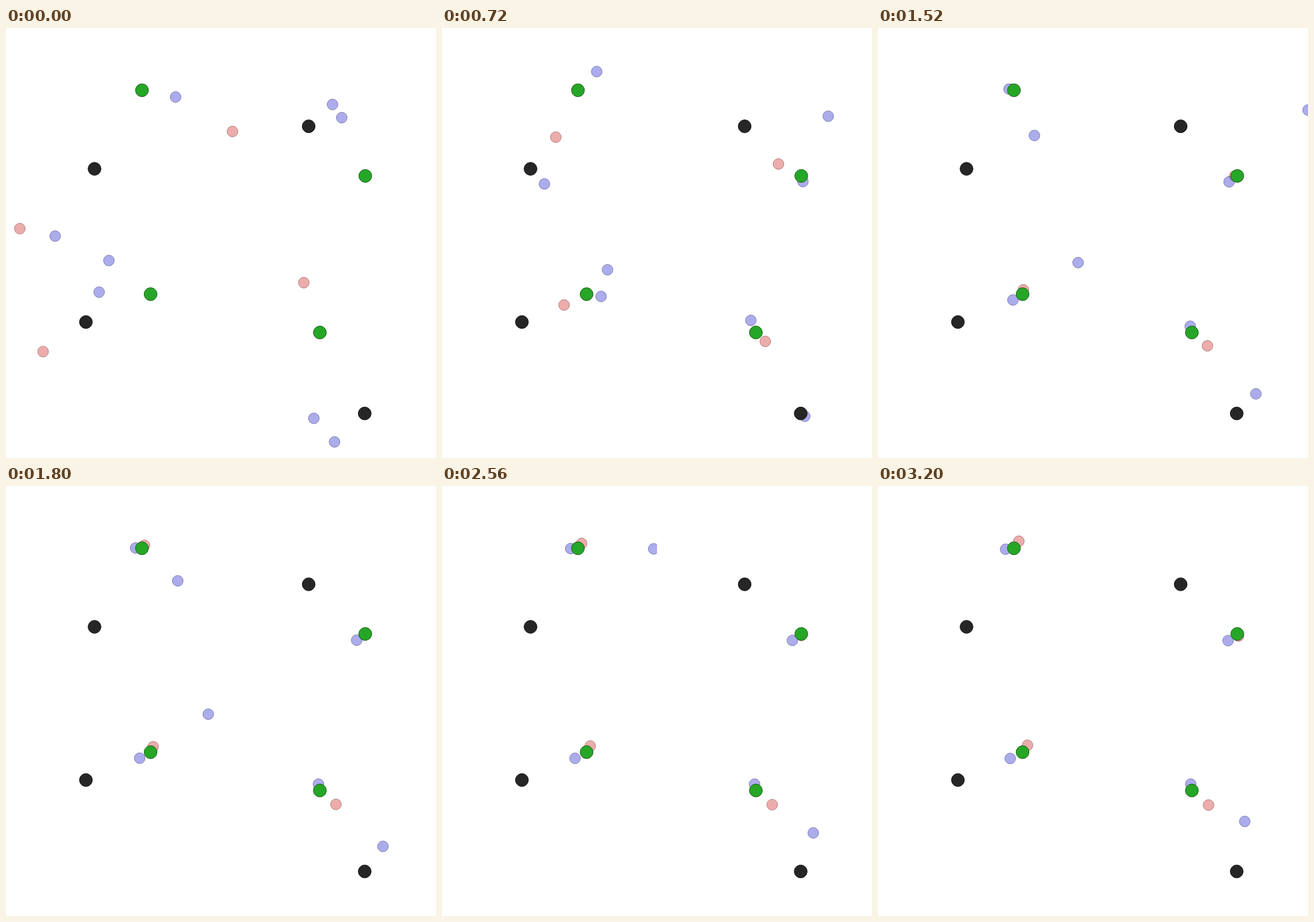
An HTML page with a canvas for the animation above (3.24 s loop, 748x748 px).

```html
<!DOCTYPE html>
<html lang="en">
<head>
<meta charset="utf-8">
<title>Moving dots</title>
<style>
  html, body { margin: 0; width: 100%; height: 100%; overflow: hidden; background: #fff; }
  canvas { display: block; }
</style>
</head>
<body>
<canvas id="stage" width="748" height="748"></canvas>
<script>
const ctx = document.getElementById("stage").getContext("2d");
const LOOP = 3240, STEP = 40, PANEL = 374;
const TIMES = [0, 440, 1040, 3200];
const RED = [217, 89, 89], BLUE = [89, 89, 217], GREEN = [38, 166, 38], BLACK = [38, 38, 38];

const mix = (a, b, u) => a.map((v, i) => v + (b[i] - v) * u);

// A seeker rushes past a turning point, covers most of the way to its resting place, then settles.
const seeker = (color, start, turn, rest) =>
  ({ color, path: [start, turn, mix(turn, rest, 0.8), rest] });

// A drifter gathers speed towards a bend and glides on from there.
const drifter = (start, bend, end) =>
  ({ color: BLUE, path: [start, mix(start, bend, 0.36), bend, end] });

const panels = [
  { col: 0, row: 0, green: [236.5, 108.3], black: [154, 245], agents: [
    seeker(RED, [24, 349], [151, 262.5], [245, 96]),
    seeker(BLUE, [295, 120], [299.5, 61], [222, 110]),
    drifter([85.5, 362], [223.5, 228], [427, 62])
  ] },
  { col: 1, row: 0, green: [625, 257.3], black: [526.5, 171], agents: [
    seeker(RED, [394, 180], [539.5, 216], [627, 261]),
    seeker(BLUE, [568, 133], [632, 251], [609, 269]),
    drifter([584, 156], [713, 151], [850, 110])
  ] },
  { col: 0, row: 1, green: [251.5, 463], black: [139, 511.5], agents: [
    seeker(RED, [64.5, 563], [168, 509], [260, 451]),
    seeker(BLUE, [162, 459.5], [291, 462], [230, 474]),
    drifter([179, 404.5], [333.5, 424], [355, 335])
  ] },
  { col: 1, row: 1, green: [546, 529.7], black: [624, 670.5], agents: [
    seeker(RED, [518, 443], [550, 528], [575, 555]),
    seeker(BLUE, [535.5, 679], [533, 522], [544, 518.5]),
    drifter([571.5, 720], [655, 654.5], [638, 583.5])
  ] }
];

// Speed at a key point, taken across its neighbours; everything starts from rest.
function speed(path, i) {
  if (i === 0) return [0, 0];
  const next = Math.min(i + 1, path.length - 1);
  return path[next].map((v, axis) => (v - path[i - 1][axis]) / (TIMES[next] - TIMES[i - 1]));
}

function position(path, t) {
  const i = t < TIMES[1] ? 0 : t < TIMES[2] ? 1 : 2;
  const h = TIMES[i + 1] - TIMES[i], u = (t - TIMES[i]) / h, w = 1 - u;
  const v0 = speed(path, i), v1 = speed(path, i + 1);
  return path[i].map((p, axis) =>
    w * w * ((1 + 2 * u) * p + u * h * v0[axis]) +
    u * u * ((3 - 2 * u) * path[i + 1][axis] - w * h * v1[axis]));
}

// Discs are 30-sided polygons.
function disc([x, y], radius, color, alpha) {
  ctx.beginPath();
  for (let i = 0; i < 30; i++) {
    const angle = i * Math.PI / 15;
    ctx.lineTo(x + radius * Math.cos(angle), y + radius * Math.sin(angle));
  }
  ctx.closePath();
  ctx.globalAlpha = alpha;
  ctx.fillStyle = `rgb(${color})`;
  ctx.fill();
  ctx.strokeStyle = `rgb(${color.map(c => c / 2)})`;
  ctx.stroke();
}

function draw() {
  const t = Math.floor(performance.now() % LOOP / STEP) * STEP;
  ctx.globalAlpha = 1;
  ctx.fillStyle = "#fff";
  ctx.fillRect(0, 0, 748, 748);
  for (const { col, row, green, black, agents } of panels) {
    ctx.save();
    ctx.beginPath();
    ctx.rect(col * PANEL, row * PANEL, PANEL, PANEL);
    ctx.clip();
    for (const { color, path } of agents) disc(position(path, t), 9.35, color, 0.5);
    disc(green, 11.2, GREEN, 1);
    disc(black, 11.2, BLACK, 1);
    ctx.restore();
  }
  requestAnimationFrame(draw);
}
draw();
</script>
</body>
</html>
```
